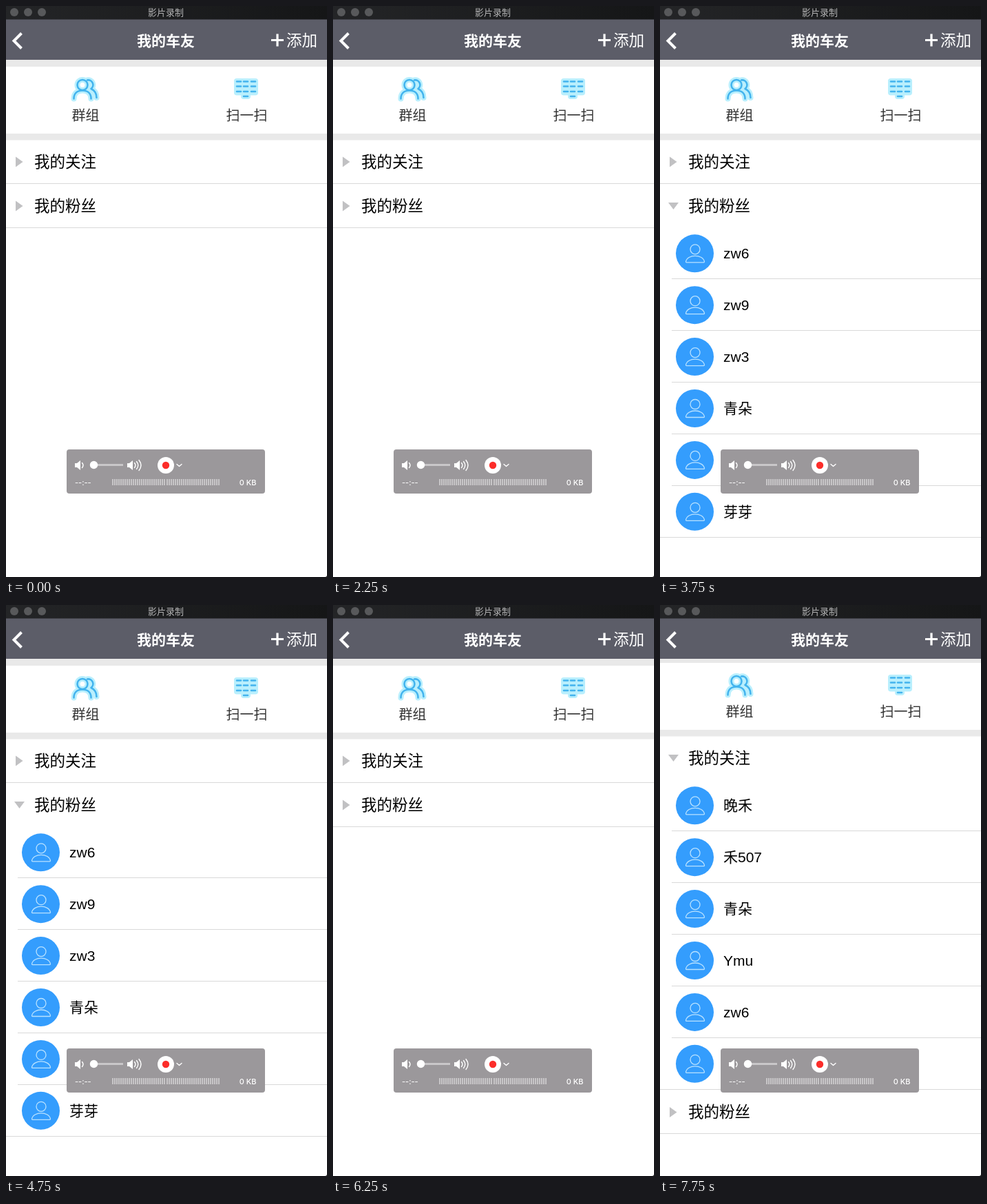
An HTML page for the animation above (8000 ms loop, 466 by 828 pixels).

```html
<!DOCTYPE html>
<html lang="zh-CN">
<head>
<meta charset="utf-8">
<style>
  html, body { margin: 0; width: 100%; height: 100%; overflow: hidden; background: #fff; }
  svg { display: block; width: 466px; height: 828px; }
  text { font-family: "Liberation Sans", "Noto Sans CJK SC", "Noto Sans CJK", sans-serif; font-size: 22.5px; }
  .cjk { font-family: "Noto Sans CJK SC", "Noto Sans CJK", sans-serif; }
  .mid { text-anchor: middle; }
  .light { font-size: 20px; font-weight: 300; fill: #333; }
  .name { font-size: 21px; }
  .small { font: 500 11px Inter, sans-serif; fill: #fff; }
  .halo { stroke: #b9effd; stroke-width: 8; }
  .ink { stroke: #43b4ee; stroke-width: 2.6; }
  .line { fill: none; stroke-linecap: round; stroke-linejoin: round; }
</style>
</head>
<body>
<svg viewBox="0 0 466 828">
  <defs>
    <g id="group">
      <circle cx="111" cy="114.5" r="7.5"/>
      <path d="M98.5 134.5C98.5 127 103 122.5 111 122.5S123.5 127 123.5 134.5M118 107.5A7 7 0 0 1 123.5 120C129 122.5 131.5 127 131.5 133"/>
    </g>
    <path id="scan" d="M335 109.5h6m4 0h6m5 0h6M335 116.5h6m4 0h6m5 0h6M335 124h6m4 0h6m5 0h6M345 131h6"/>
    <g id="avatar">
      <circle r="27.5" fill="#349dfd"/>
      <g class="line" stroke="#b9e2ff" stroke-width="1.3">
        <circle cx=".5" cy="-6" r="7"/>
        <path d="M-13 12C-12 6.500 -6 3.500 .5 3.500S13 6.500 14 12Q14 13 13 13H-12Q-13 13 -13 12Z"/>
      </g>
    </g>
    <linearGradient id="bar"><stop stop-color="#242527"/><stop offset="1" stop-color="#151617"/></linearGradient>
  </defs>

  <g id="page">
    <path d="M0 60H466V88H0ZM0 185H466V194.5H0Z" fill="#e9e9e9"/>
    <g class="line">
      <use href="#group" class="halo"/>
      <use href="#group" class="ink"/>
      <rect x="331" y="105" width="35" height="24.5" rx="4" fill="#b9effd"/>
      <use href="#scan" class="halo"/>
      <use href="#scan" class="ink"/>
    </g>
    <text class="cjk mid light" x="115.5" y="166">群组</text>
    <text class="cjk mid light" x="349.5" y="166">扫一扫</text>
    <g id="list"></g>
  </g>

  <rect width="466" height="20" fill="url(#bar)"/>
  <g fill="#58595b"><circle cx="12" cy="9" r="6"/><circle cx="32" cy="9" r="6"/><circle cx="52" cy="9" r="6"/></g>
  <text class="cjk mid" x="232" y="14" fill="#b4b4b5" style="font-size:13px">影片录制</text>
  <rect y="19.5" width="466" height="58.5" fill="#5c5d68"/>
  <path d="M22.5 39.5L11.5 50.5L22.5 61.5" fill="none" stroke="#fff" stroke-width="4"/>
  <path d="M385 49.5H403M394 40.5V58.5" stroke="#fff" stroke-width="3.2"/>
  <text class="cjk mid" x="232" y="58" fill="#fff" style="font-size:21px;font-weight:700">我的车友</text>
  <text class="cjk" x="407" y="58" fill="#fff" style="font-weight:300">添加</text>

  <rect x="88" y="643" width="288" height="64" rx="4" fill="#9b989b"/>
  <path d="M100 663h3l5-4v14l-5-4h-3zM176 663h3l5-4v14l-5-4h-3z" fill="#fff"/>
  <path class="line" d="M110.5 662.5q3 3.5 0 7M186.5 662.5q3 3.5 0 7M189.5 660.5q4.5 5.5 0 11M193 658.5q6 7.5 0 15M248 664.5l3.5 3 3.5-3" stroke="#fff" stroke-width="1.4"/>
  <path d="M132 665.5H170" stroke="#c9c7c9" stroke-width="3"/>
  <circle cx="127.5" cy="665.5" r="5.7" fill="#fff"/>
  <circle cx="232" cy="666" r="12" fill="#fff"/>
  <circle cx="232" cy="666" r="5.2" fill="#fc2d2a"/>
  <path d="M154 690.5H231M233 690.5H310" stroke="#c8c6c8" stroke-width="9" stroke-dasharray="2 1"/>
  <text class="small" x="100" y="695">--:--</text>
  <text class="small" x="363.5" y="695" text-anchor="end">0 KB</text>
  <path d="M466 826v2h-2z" fill="#444"/>
</svg>
<script>
const LOOP = 8000, STEP = 250, HEAD = 64, ROW = 74.9;
const sections = [
  { title: '我的关注', names: ['晚禾', '禾507', '青朵', 'Ymu', 'zw6', ''] },
  { title: '我的粉丝', names: ['zw6', 'zw9', 'zw3', '青朵', '', '芽芽'] }
];
const page = document.getElementById('page');
const list = document.getElementById('list');

const divider = (x, y) => `<rect x="${x}" y="${Math.floor(y - 1)}" width="466" height="1" fill="#d9d9d9"/>`;

function listMarkup(open) {
  let y = 194, out = '';
  sections.forEach(({ title, names }, i) => {
    const mid = y + 32;
    const arrow = open === i ? `M12 ${mid - 5}h15l-7.5 10z` : `M14 ${mid - 7.5}v15l10.5-7.5z`;
    out += `<path d="${arrow}" fill="#c1c1c3"/><text class="cjk" x="41" y="${mid + 8}">${title}</text>`;
    y += HEAD;
    if (open === i) {
      names.forEach((name, n) => {
        const cy = y + 36.8;
        out += `<use href="#avatar" x="50.5" y="${cy}"/><text class="name" x="92" y="${cy + 7.5}">${name}</text>`;
        y += ROW;
        if (n < names.length - 1) out += divider(17, y);
      });
    }
    out += divider(0, y);
  });
  return out;
}

function openSection(t) {
  if (t >= 6500) return 0;
  return t >= 2500 && t < 5250 ? 1 : -1;
}

function scrollAt(t) {
  if (t >= 5250 && t < 6000) return 25.5 * Math.sin(Math.PI * (t - 5000) / 1000) ** 2;
  return t > 7500 ? 4 * (t - 7500) / STEP : 0;
}

let shown;
function draw(now) {
  const t = Math.floor(now % LOOP / STEP) * STEP;
  const open = openSection(t);
  if (open !== shown) list.innerHTML = listMarkup(shown = open);
  page.setAttribute('transform', `translate(0 ${-scrollAt(t)})`);
  requestAnimationFrame(() => draw(performance.now() - start));
}
const start = performance.now();
draw(0);
</script>
</body>
</html>
```
